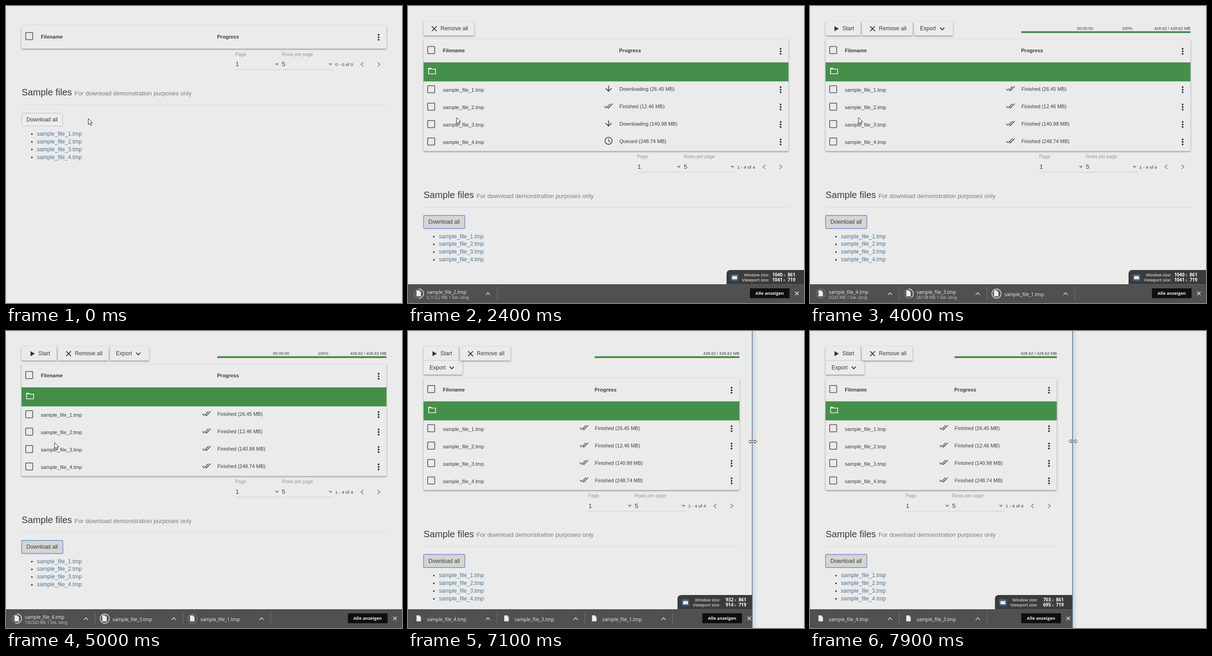
An HTML page with a canvas that plays this animation: 864 px wide and 648 px high, repeating every 8 s.

```html
<!DOCTYPE html>
<html lang="en">
<head>
<meta charset="utf-8">
<title>Download table</title>
<style>
html, body { margin: 0; width: 100%; height: 100%; overflow: hidden; background: #ebebeb; }
canvas { display: block; }
</style>
</head>
<body>
<canvas id="stage" width="864" height="648"></canvas>
<script>
const ctx = document.getElementById('stage').getContext('2d');
const W = 864, H = 648, LOOP = 8000, STEP = 100;
const BG = '#ebebeb', INK = '#3c3c3c', GREEN = '#468f4b';
const UI = '"Liberation Sans", Arial, sans-serif';
const SHELF = '"Open Sans", "Noto Sans", sans-serif';

const T_ADDED = 1600, T_SHELF = 2300, T_FINISHED = 2800, T_RESIZE = 6700;
const ROW = 38, WRAP = 30.5, ITEM = 191.5;

// Table rows: size label, download start, download end
const rows = [
  { size: '26.45', from: 1600, to: 2700 },
  { size: '12.46', from: 1600, to: 2200 },
  { size: '140.98', from: 2200, to: 2800 },
  { size: '248.74', from: 2700, to: 2800 },
];
// Browser shelf, newest first; duration fills the ring, then it fades at done
const saves = [
  { id: 4, start: 4000, duration: 1786, done: 5800, total: 243 },
  { id: 3, start: 3500, duration: 1200, done: 5100, total: 138 },
  { id: 1, start: 2900, duration: 523, done: 4600, total: 25.8 },
  { id: 2, start: 2300, duration: 200, done: 2500, total: 12.2 },
];
// time, window edge, table right, shelf right, window width
const resizeKeys = [
  [6600, 866, 830, 864, 1040],
  [6900, 802, 774, 811, 994],
  [7500, 650, 621, 658.5, 809],
  [7800, 597, 564, 604, 735],
  [7900, 573, 538.5, 579, 703],
];
// time, x, y
const cursorKeys = [
  [600, 179.5, 245.5], [1200, 106, 243.5], [6000, 106, 243.5], [6500, 869, 249],
  [6600, 869, 249], [6900, 803, 244], [7500, 650, 236], [7900, 574, 240.5],
];

const clamp = v => Math.max(0, Math.min(1, v));

function track(keys, t) {
  if (t <= keys[0][0]) return keys[0].slice(1);
  for (let i = 1; i < keys.length; i++) {
    const a = keys[i - 1], b = keys[i];
    if (t <= b[0]) {
      const k = (t - a[0]) / (b[0] - a[0]);
      return a.slice(1).map((v, j) => v + (b[j + 1] - v) * k);
    }
  }
  return keys[keys.length - 1].slice(1);
}

function text(str, x, y, size, { color = INK, font = UI, weight = 400, align = 'left' } = {}) {
  ctx.font = `${weight} ${size}px ${font}`;
  ctx.fillStyle = color;
  ctx.textAlign = align;
  ctx.fillText(str, x, y);
}

function rect(x, y, w, h, color) {
  ctx.fillStyle = color;
  ctx.fillRect(x, y, w, h);
}

function line(points, color, width = 1) {
  ctx.beginPath();
  points.forEach(([x, y]) => ctx.lineTo(x, y));
  ctx.strokeStyle = color;
  ctx.lineWidth = width;
  ctx.stroke();
}

function shape(points, fill, stroke, width = 1) {
  ctx.beginPath();
  points.forEach(([x, y]) => ctx.lineTo(x, y));
  ctx.closePath();
  ctx.fillStyle = fill;
  ctx.fill();
  if (stroke) {
    ctx.strokeStyle = stroke;
    ctx.lineWidth = width;
    ctx.stroke();
  }
}

function box(x, y, w, h, radius, fill, stroke, width = 1) {
  ctx.beginPath();
  ctx.roundRect(x, y, w, h, radius);
  if (fill) { ctx.fillStyle = fill; ctx.fill(); }
  if (stroke) { ctx.strokeStyle = stroke; ctx.lineWidth = width; ctx.stroke(); }
}

function arc(x, y, r, turn, color, width) {
  ctx.beginPath();
  ctx.arc(x, y, r, -Math.PI / 2, -Math.PI / 2 + turn * 2 * Math.PI);
  ctx.strokeStyle = color;
  ctx.lineWidth = width;
  ctx.stroke();
}

function raised(x, y, w, h) {
  ctx.save();
  ctx.shadowColor = 'rgba(0,0,0,.42)';
  ctx.shadowBlur = 3.5;
  ctx.shadowOffsetY = 1.4;
  box(x, y, w, h, 1, BG);
  ctx.restore();
}

function cross(x, y, r, color, width) {
  line([[x - r, y - r], [x + r, y + r]], color, width);
  line([[x + r, y - r], [x - r, y + r]], color, width);
}

function chevron(x, y, dx, dy, color, width) {
  // Either dx or dy sets the pointing direction
  const pts = dx ? [[x - dx / 2, y - 4.5], [x + dx / 2, y], [x - dx / 2, y + 4.5]]
                 : [[x - 4.5, y - dy / 2], [x, y + dy / 2], [x + 4.5, y - dy / 2]];
  line(pts, color, width);
}

const checkbox = y => box(42.9, y - 7.6, 15.4, 15.4, 1, null, '#666', 1.8);

function kebab(x, y) {
  ctx.fillStyle = '#333';
  for (const d of [-5.5, 0, 5.5]) {
    ctx.beginPath();
    ctx.arc(x, y + d, 1.9, 0, 7);
    ctx.fill();
  }
}

function statusIcon(kind, x, y) {
  if (kind === 'Queued') {
    arc(x, y, 7.7, 1, INK, 1.6);
    line([[x, y - 4.5], [x, y + 0.5], [x + 3.5, y + 2.8]], INK, 1.4);
  } else if (kind === 'Downloading') {
    line([[x, y - 6.5], [x, y + 5.5]], INK, 1.7);
    line([[x - 6.3, y - 0.5], [x, y + 5.8], [x + 6.3, y - 0.5]], INK, 1.7);
  } else {
    line([[x - 9, y + 0.6], [x - 5, y + 4.7]], INK, 1.5);
    line([[x - 4.7, y + 0.6], [x - 0.6, y + 4.7], [x + 9, y - 5]], INK, 1.5);
    line([[x + 4.2, y - 5], [x - 1.8, y + 1]], INK, 1.5);
  }
}

function toolbar(t, wrapped, right, mid) {
  const finished = t >= T_FINISHED;
  const shift = finished ? 79.3 : 0;
  if (finished) {
    raised(34, 34, 76, 30.5);
    shape([[53.5, 44], [53.5, 55], [62.8, 49.5]], '#333');
    text('Start', 70.5, 53.3, 12.2);
    const ex = wrapped ? -193 : 0, ey = wrapped ? WRAP : 0;
    raised(227 + ex, 34 + ey, 85, 30.5);
    text('Export', 240 + ex, 53.3 + ey, 12.1);
    chevron(288.5 + ex, 49.7 + ey, 0, 5, '#333', 1.8);
  }
  raised(34 + shift, 34, 110.5, 30.5);
  cross(57.2 + shift, 49.5, 5.3, '#333', 1.7);
  text('Remove all', 71 + shift, 53.3, 12);

  if (finished) {
    const fill = clamp((t - 2835) / 410);
    rect(mid, 55, right - mid, 4, '#b4d2b6');
    rect(mid, 55, (right - mid) * fill, 4, GREEN);
    if (!wrapped) {
      text('00:00:00', 582.3, 51.5, 9.1);
      text('100%', 680.5, 51.5, 9);
    }
    text('428.62 / 428.62 MB', right, 51.5, 9.05, { align: 'right' });
  }
}

function table(t, dy, right, mid) {
  const filled = t >= T_ADDED;
  raised(34, 72.5 + dy, right - 34, filled ? 244 : 51);
  checkbox(96 + dy);
  text('Filename', 76, 101.3 + dy, 11.05, { weight: 700 });
  text('Progress', mid - 0.5, 101.3 + dy, 11.05, { weight: 700 });
  kebab(right - 17, 98.7 + dy);
  if (!filled) return;

  rect(34, 123 + dy, right - 34, 41.5, GREEN);
  const fy = 135.8 + dy;
  shape([[44.8, fy], [50, fy], [51.8, fy + 2], [60.2, fy + 2], [60.2, fy + 12.2], [44.8, fy + 12.2]],
        GREEN, '#f2f2f2', 1.6);
  rect(44.8, fy, 6, 2.4, '#f2f2f2');

  rows.forEach((row, i) => {
    const y = 181.5 + i * ROW + dy;
    const status = t >= row.to ? 'Finished' : t >= row.from ? 'Downloading' : 'Queued';
    checkbox(y);
    text(`sample_file_${i + 1}.tmp`, 76, y + 5.7, 11.1);
    statusIcon(status, mid - 23.4, y - 1.3);
    text(`${status} (${row.size} MB)`, mid + 0.3, y + 3.5, 10.95);
    kebab(right - 17, y + 1);
  });
}

function pager(t, dy, right) {
  const x = right - 330, gray = '#8e8e8e', y = 351 + dy;
  text('Page', x, y - 18.6, 10.2, { color: '#999' });
  text('Rows per page', x + 101.5, y - 18.6, 10.2, { color: '#999' });
  text('1', x + 0.8, y + 4, 13.6);
  text('5', x + 101.7, y + 4, 13.6);
  for (const cx of [x + 91, x + 208]) shape([[cx - 4.5, y - 2], [cx + 4.5, y - 2], [cx, y + 2.5]], gray);
  rect(x, y + 11, 99, 1, '#cbcbcb');
  rect(x + 101.5, y + 11, 113.5, 1, '#cbcbcb');
  text(t >= T_ADDED ? '1 - 4 of 4' : '0 - 0 of 0', x + 218.3, y + 3.6, 9.9);
  chevron(x + 277, y, -5, 0, gray, 1.7);
  chevron(x + 313.3, y, 5, 0, gray, 1.7);
}

function samples(t, dy, right, hover) {
  text('Sample files', 34, 419 + dy, 20.2);
  text('For download demonstration purposes only', 149.5, 418.5 + dy, 13.32, { color: '#7c7c7c' });
  rect(34, 439 + dy, right - 34, 1, '#dadada');
  if (t >= 1400) box(34, 457 + dy, 90, 28.5, 2, '#d5d5d5', '#7f9fd0', 1.8);
  else box(34.5, 457.5 + dy, 89, 28, 3, hover ? '#dcdcdc' : '#ededed', '#b9b9b9');
  text('Download all', 44.5, 475.3 + dy, 11.97);
  for (let i = 0; i < 4; i++) {
    const y = 502.5 + i * 16.9 + dy;
    ctx.fillStyle = INK;
    ctx.beginPath();
    ctx.arc(56.5, y + 0.7, 1.8, 0, 7);
    ctx.fill();
    text(`sample_file_${i + 1}.tmp`, 67.5, y + 4, 12.07, { color: '#4d7496' });
  }
}

function shelfItem(t, save, x) {
  const part = clamp((t - save.start) / save.duration);
  const ring = 1 - clamp((t - save.done) / 500);
  if (ring > 0) {
    ctx.globalAlpha = ring;
    arc(x + 24, 627.5, 10, 1, '#70767a', 1.6);
    arc(x + 24, 627.5, 10, part, '#bccbd6', 1.8);
    ctx.globalAlpha = 1;
  }
  shape([[x + 18.5, 620.5], [x + 25, 620.5], [x + 28.3, 623.8], [x + 28.3, 633.5], [x + 18.5, 633.5]], '#ececec');
  shape([[x + 25, 620.5], [x + 28.3, 623.8], [x + 25, 623.8]], '#a8a8a8');

  const name = `sample_file_${save.id}.tmp`;
  const style = { font: SHELF, color: '#f0f0f0' };
  if (part < 1) {
    const digits = save.total < 100 ? 1 : 0;
    const mb = v => v.toFixed(digits).replace('.', ',');
    text(name, x + 41, 628.3, 10.25, style);
    text(`${mb(save.total * part)}/${mb(save.total)} MB, 1 Sek. übrig`, x + 41, 639, 8.05,
         { font: SHELF, color: '#cfcfcf' });
  } else {
    text(name, x + 41, 633.3, 10.25, style);
  }
  chevron(x + 174.5, 628, 0, -4.5, '#d5d5d5', 1.6);
  rect(x + 194, 613, 1, 29, '#747474');
}

function shelf(t, right) {
  rect(0, 607, W, 41, '#505050');
  rect(0, 607, W, 1, '#5e5e5e');
  const slots = Math.floor((right - 119) / ITEM);
  saves.filter(s => t >= s.start).slice(0, slots).forEach((s, i) => shelfItem(t, s, i * ITEM));
  rect(right - 118, 616, 86.5, 21.5, '#0e0e0e');
  text('Alle anzeigen', right - 75, 630.2, 9.4, { font: SHELF, weight: 700, color: '#f4f4f4', align: 'center' });
  cross(right - 15.5, 627, 3.8, '#e0e0e0', 1.6);
}

function sizeTip(right, windowWidth, viewportWidth) {
  const x = right - 169;
  box(x, 576, 175, 31, [8, 0, 0, 0], '#3b3b3b');
  box(x + 10, 586, 15, 13, 1, '#2e4a66', '#5a82a8', 1);
  rect(x + 12, 588, 11, 8.5, '#e8edf2');
  rect(x + 12, 588, 11, 2, '#7fa6cc');
  const line2 = [['Window size:', windowWidth, 861, 590], ['Viewport size:', viewportWidth, 719, 601]];
  for (const [label, w, h, y] of line2) {
    const style = { font: SHELF, weight: 700, align: 'right', color: '#fff' };
    text(label, x + 93, y, 8.55, { ...style, color: '#b8b8b8' });
    text(Math.round(w), x + 122, y, 9.8, style);
    text('x', x + 128.5, y, 8.5, { ...style, weight: 400, color: '#ccc' });
    text(h, x + 150, y, 9.8, style);
  }
}

function pointer(x, y) {
  const pts = [[0, 0], [0, 13], [3, 10.2], [5.2, 15.2], [7.4, 14.2], [5.3, 9.3], [9.3, 9.3]];
  shape(pts.map(([a, b]) => [x + a, y + b]), '#fff', '#222', 1);
}

function resizer(x, y) {
  const half = [[-9.5, 0], [-5, -4], [-5, -1.5], [5, -1.5], [5, -4], [9.5, 0], [5, 4], [5, 1.5], [-5, 1.5], [-5, 4]];
  shape(half.map(([a, b]) => [x + a, y + b]), '#fff', '#222', 1);
}

function draw(t) {
  const [edge, right, shelfRight, windowWidth] = track(resizeKeys, t);
  const [cx, cy] = track(cursorKeys, t);
  const mid = 461 + (right - 830) / 2;
  const wrapped = right < 790;
  const filled = t >= T_ADDED;
  const headDy = !filled ? -WRAP : wrapped ? WRAP : 0;
  const lowDy = filled ? headDy : -223.7;

  rect(0, 0, W, H, BG);
  ctx.save();
  ctx.beginPath();
  ctx.rect(0, 0, edge, H);
  ctx.clip();
  if (filled) toolbar(t, wrapped, right, mid);
  table(t, headDy, right, mid);
  pager(t, lowDy, right);
  samples(t, lowDy, right, cx < 124);
  if (t >= T_SHELF) shelf(t, shelfRight);
  if ((t >= T_SHELF && t < 4400) || t >= T_RESIZE) {
    sizeTip(right + 34, windowWidth, 793 + (right - 621) / 0.842);
  }
  ctx.restore();

  if (edge < W) {
    const shade = ctx.createLinearGradient(edge, 0, edge + 12, 0);
    shade.addColorStop(0, 'rgba(0,0,0,.09)');
    shade.addColorStop(1, 'rgba(0,0,0,0)');
    rect(edge, 0, 12, H, shade);
    rect(edge - 1, 0, 1.5, H, '#46789e');
  }
  if (t < 6500) pointer(cx, cy);
  else resizer(cx, cy);
}

function frame(now) {
  draw(Math.floor((now % LOOP) / STEP) * STEP);
  requestAnimationFrame(frame);
}
draw(0);
requestAnimationFrame(frame);
</script>
</body>
</html>
```
